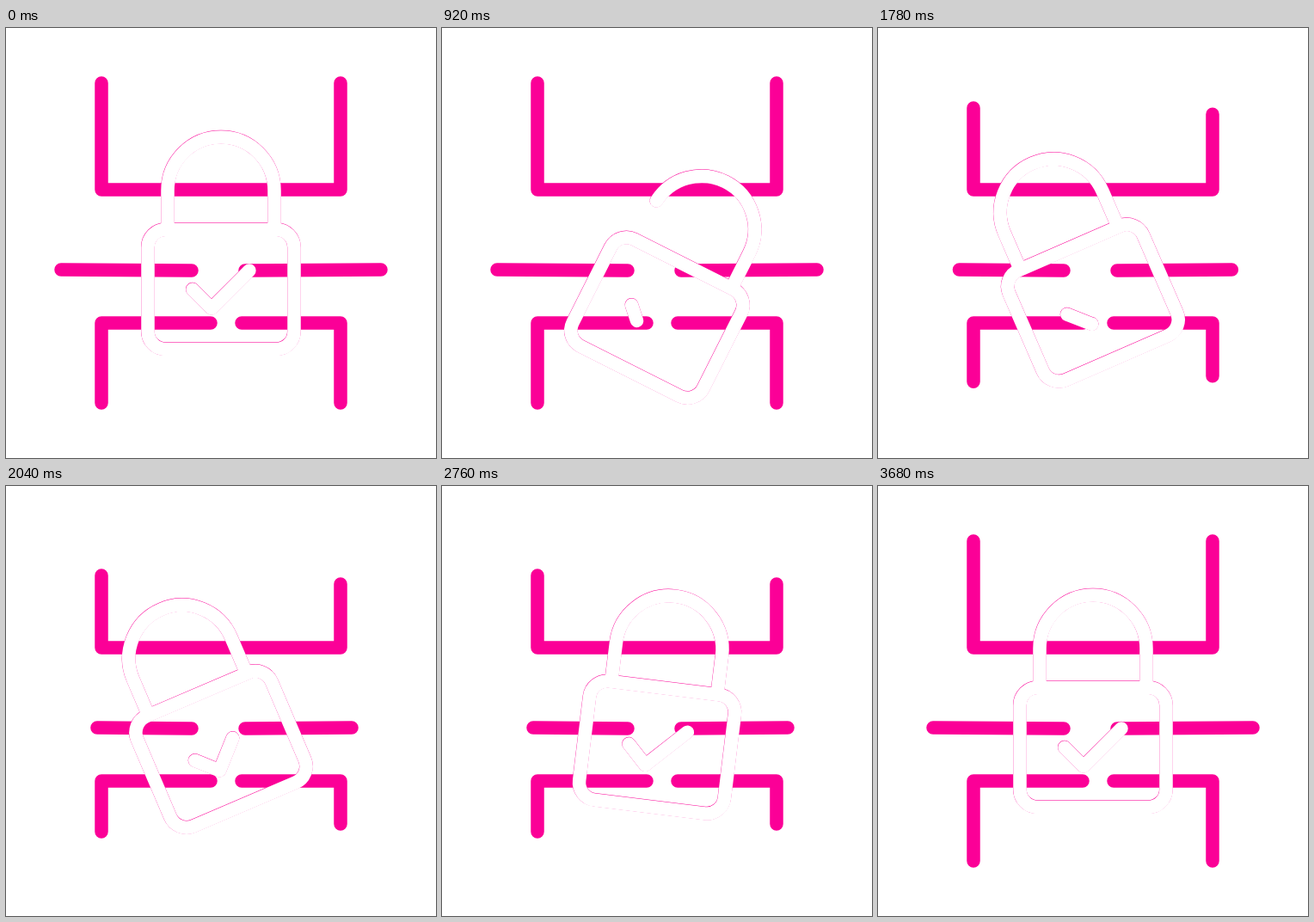
Write an HTML page with a canvas that moves like this. It is 500 px wide and 500 px high and loops after 4000 ms.

```html
<!DOCTYPE html>
<html lang="en">
<head>
<meta charset="utf-8">
<title>Lock</title>
<style>
  html, body { margin: 0; width: 100%; height: 100%; overflow: hidden; background: #fff; }
  canvas { display: block; width: 500px; height: 500px; }
</style>
</head>
<body>
<canvas id="stage" width="500" height="500"></canvas>
<script>
const ctx = document.getElementById('stage').getContext('2d');
const PINK = '#fb0097';
const LOOP = 4000;

const linear = u => u;
const smooth = u => u * u * (3 - 2 * u);

// Keys are [time, value] pairs in order of time.
function track(keys, ease = smooth) {
  return t => {
    if (t <= keys[0][0]) return keys[0][1];
    for (let i = 1; i < keys.length; i++) {
      const [t0, a] = keys[i - 1], [t1, b] = keys[i];
      if (t < t1) return a + (b - a) * ease((t - t0) / (t1 - t0));
    }
    return keys[keys.length - 1][1];
  };
}

const tilt = track([[0, 0], [1240, 32], [1890, -28], [2610, 15], [2990, -8], [3400, 0]]);
const drop = track([[0, 0], [800, 33], [1370, 33], [2170, 0]]);
const shackleCut = track([[0, 0], [1160, 65], [1300, 65], [1740, 0]], linear);
const checkCut = track([[0, 0], [1160, 93.3], [1580, 93.3], [2180, 0]], linear);
const shrink = track([[1257, 0], [2057, 1], [2870, 1], [3680, 0]]);
const shrinkLate = track([[1257, 0], [2057, 1], [3040, 1], [3680, 0]]);

function line(...points) {
  ctx.beginPath();
  points.forEach(([x, y]) => ctx.lineTo(x, y));
  ctx.stroke();
}

function drawWires(t) {
  const s = shrink(t);
  ctx.strokeStyle = PINK;
  ctx.lineWidth = 15.5;
  line([111, 64 + 40 * s], [111, 188], [389, 188], [389, 64 + 50 * s]);
  line([64 + 42 * shrinkLate(t), 281], [216, 282]);
  line([278, 282], [436 - 34 * s, 281]);
  line([111, 436 - 34 * s], [111, 343], [238, 343]);
  line([274, 343], [389, 343], [389, 436 - 43 * s]);
}

// Strokes the current path up to the given length.
function strokeUpTo(length) {
  if (length <= 0.5) return;
  ctx.setLineDash([length, 1000]);
  ctx.stroke();
  ctx.setLineDash([]);
}

function drawLock(t, color, width, dx, dy) {
  ctx.save();
  ctx.translate(250 + dx, 304 + drop(t) + dy);
  ctx.rotate(tilt(t) * Math.PI / 180);
  ctx.strokeStyle = color;
  ctx.lineWidth = width;

  ctx.beginPath();
  ctx.moveTo(62, -70);
  ctx.arc(0, -115, 62, 0, Math.PI, true);
  ctx.lineTo(-62, -70);
  strokeUpTo(90 + 62 * Math.PI - shackleCut(t));

  ctx.beginPath();
  ctx.roundRect(-85, -69.5, 170, 139, 20.5);
  ctx.stroke();

  ctx.beginPath();
  ctx.moveTo(-33, 0);
  ctx.lineTo(-11, 22);
  ctx.lineTo(33, -22);
  strokeUpTo(93.3 - checkCut(t));
  ctx.restore();
}

function frame(now) {
  const t = now % LOOP;
  ctx.fillStyle = '#fff';
  ctx.fillRect(0, 0, 500, 500);
  ctx.lineCap = ctx.lineJoin = 'round';
  drawWires(t);
  drawLock(t, PINK, 15.7, -0.15, -0.35);
  drawLock(t, '#fff', 15.5, 0, 0);
  requestAnimationFrame(frame);
}
requestAnimationFrame(frame);
</script>
</body>
</html>
```
